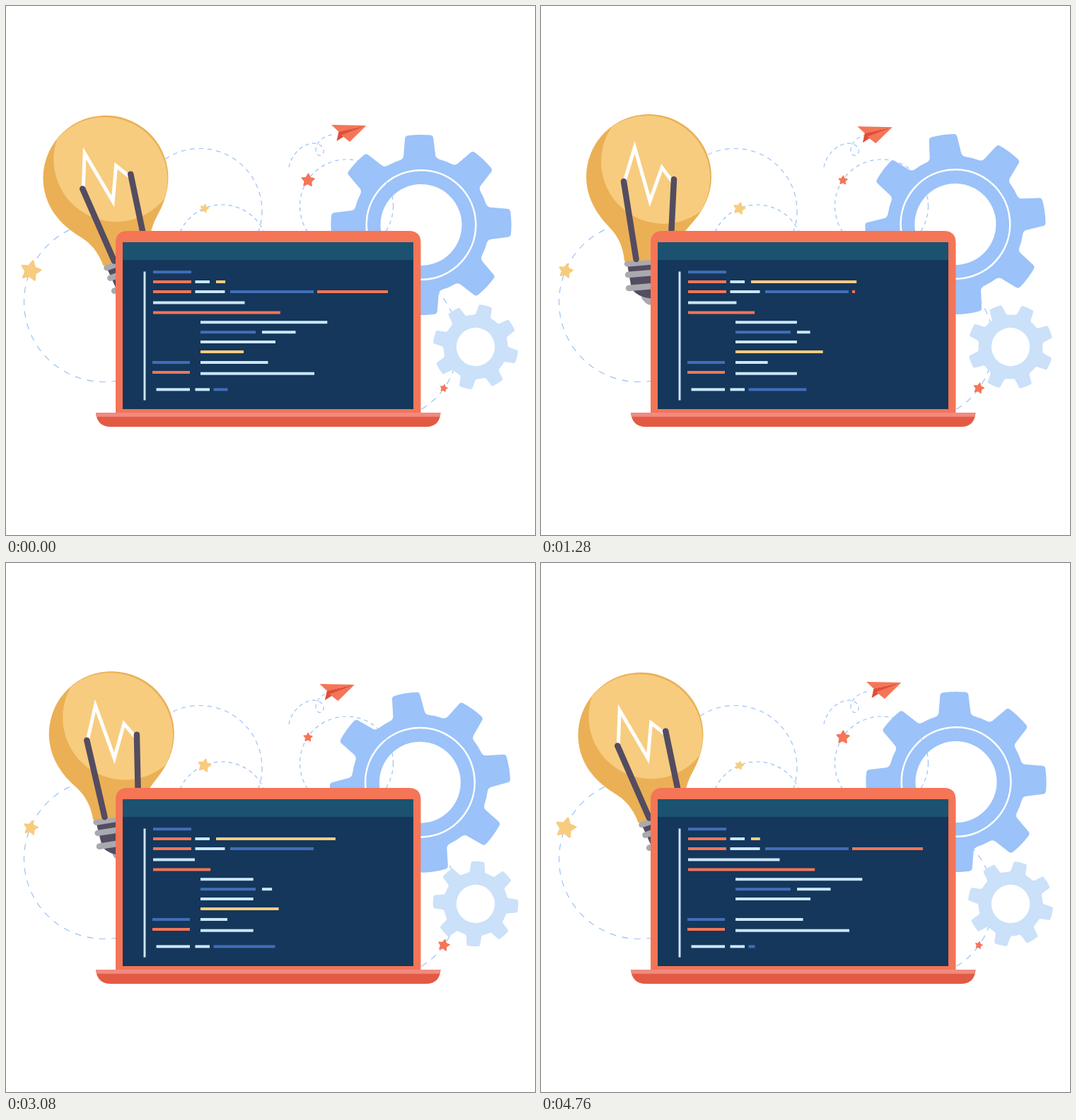
Write an HTML page that moves like this. It is 748 px wide and 748 px high and loops after 4800 ms.

```html
<!DOCTYPE html>
<html lang="en">
<head>
<meta charset="utf-8">
<title>Coding ideas</title>
<style>
  html, body { margin: 0; width: 100%; height: 100%; overflow: hidden; background: #fff; }
  svg { display: block; width: 100%; height: 100%; }
</style>
</head>
<body>
<svg viewBox="0 0 748 748" xmlns="http://www.w3.org/2000/svg">
  <rect width="748" height="748" fill="#fff"/>

  <g fill="none" stroke="#9bc2f9" stroke-width="1.2">
    <circle cx="138.5" cy="418.5" r="113" stroke-dasharray="9 8.5"/>
    <circle cx="274" cy="289.5" r="88" stroke-dasharray="6.5 6"/>
    <circle cx="305.5" cy="346" r="65" stroke-dasharray="5.5 5"/>
    <circle cx="531" cy="477.6" r="108.5" stroke-dasharray="9 8"/>
    <path stroke-dasharray="5.5 4.5" d="M400 228C403 211 418 195 435 194C446 194 452 203 448 209C444 214 438 211 438 203C438 193 449 184 461 182"/>
  </g>

  <g id="bigGear"></g>
  <circle cx="481.5" cy="283" r="66" fill="none" stroke="#9bc2f9" stroke-width="1.2" stroke-dasharray="5.5 5"/>
  <g id="smallGear"></g>

  <g id="plane">
    <path fill="#de4f3a" d="M509 169L470.5 177.5L467.5 191L477 185Z"/>
    <path fill="#f57557" d="M460 168L509.5 169L470.5 177.7ZM509.5 169L474 182.5L486 192Z"/>
  </g>

  <g id="stars" stroke-linejoin="round" stroke-width="2"></g>

  <g id="bulb">
    <path fill="#a9a9b0" d="M141 408H166V419Q153.500 427 146 418Q142 415 141 408Z"/>
    <path fill="#544c60" d="M121 360H184V402Q168 413 155 413.500Q137 412 128 400Z"/>
    <path fill="none" stroke="#a9a9b0" stroke-width="8.500" stroke-linecap="round" d="M122 364.500L184 359M123 380L184 375M124 399L182 394"/>
    <path fill="#ebb055" d="M64 241.500A88.500 88.500 0 0 1 241 241.500C241 268 229 291 210 311C196 326 189 341 188 358L118 361C116 341 110 326 95 311C76 291 64 268 64 241.500Z"/>
    <path fill="#f7cc7f" d="M100 170.900A88.500 88.500 0 0 1 225.500 290.600A88 88 0 0 1 100 170.900Z"/>
    <path fill="none" stroke="#fff" stroke-width="5" d="M118 248L132.500 200L154 276L171 228.500L187 250"/>
    <path fill="none" stroke="#544c60" stroke-width="8.500" stroke-linecap="round" d="M117 248L134.500 358M188 245L182.500 357"/>
  </g>

  <path fill="#f57557" d="M155 576V335Q155 318 172 318H569.500Q586.500 318 586.500 335V576Z"/>
  <rect x="165" y="334" width="411" height="236" fill="#14375b"/>
  <rect x="165" y="334" width="411" height="25" fill="#1b5270"/>
  <path fill="#e35a44" d="M127 575H614.500Q613 595 594 595H148Q129 595 127 575Z"/>
  <path fill="#f08b80" d="M127 575H614.500L613.500 580.700H128Z"/>
  <g id="code"></g>
</svg>

<script>
const LOOP = 4800, SPAN = 4760, TURN = 2220;
const NS = "http://www.w3.org/2000/svg";
const $ = id => document.getElementById(id);
const RED = "#f57557", YELLOW = "#f7cc7f", PALE = "#cbe6fa", BLUE = "#426db8";

function add(parent, tag, attrs) {
  const el = document.createElementNS(NS, tag);
  for (const k in attrs) el.setAttribute(k, attrs[k]);
  return parent.appendChild(el);
}

const mix = (a, b, k) => a + (b - a) * k;
const clamp = (v, lo, hi) => Math.max(lo, Math.min(hi, v));
const tri = (t, period) => 1 - Math.abs(1 - (t % period) / period * 2);
const cubic = u => u < 0.5 ? 4 * u ** 3 : 1 - 4 * (1 - u) ** 3;

// Eight-tooth outline around the origin, one tooth pointing up
function gearPath() {
  const tooth = [[-27, -92.5], [-22.8, -94.5], [-22.5, -98.5], [-20, -122.5],
    [-19.6, -126], [-16, -126.6], [16, -126.6], [19.6, -126],
    [20, -122.5], [22.5, -98.5], [22.8, -94.5], [27, -92.5]];
  let d = "";
  for (let i = 0; i < 8; i++) {
    const a = i * Math.PI / 4, c = Math.cos(a), s = Math.sin(a);
    const p = tooth.map(([x, y]) => (x * c - y * s).toFixed(2) + " " + (x * s + y * c).toFixed(2));
    d += (i ? "A96.4 96.4 0 0 1 " : "M") + p[0] +
      `Q${p[1]} ${p[2]}L${p[3]}Q${p[4]} ${p[5]}A127.500 127.500 0 0 1 ${p[6]}` +
      `Q${p[7]} ${p[8]}L${p[9]}Q${p[10]} ${p[11]}`;
  }
  return d + "A96.4 96.4 0 0 1 " + tooth[0].join(" ") + "Z";
}

const HOLE = "M57.500 0A57.500 57.500 0 1 0 -57.500 0A57.500 57.500 0 1 0 57.500 0Z";
add($("bigGear"), "path", { d: gearPath() + HOLE, fill: "#9bc2f9", "fill-rule": "evenodd" });
add($("bigGear"), "circle", { r: 77.3, fill: "none", stroke: "#fff", "stroke-width": 2.6 });
add($("smallGear"), "path", { d: gearPath(), fill: "#cbe0f9" });
add($("smallGear"), "circle", { r: 57.5, fill: "#fff" });

function starPath() {
  let d = "";
  for (let i = 0; i < 10; i++) {
    const a = i * Math.PI / 5, r = i % 2 ? 4.8 : 9.3;
    d += (i ? "L" : "M") + (r * Math.sin(a)).toFixed(2) + " " + (-r * Math.cos(a)).toFixed(2);
  }
  return d + "Z";
}

// x, y, tilt, colour, radius at the ends, radius in the middle, shrinks early
const stars = [
  [35, 374.5, 13, YELLOW, 15, 10.6, true],
  [280.5, 286.3, 13, YELLOW, 6.5, 11.1, false],
  [427, 246.5, 3, RED, 9.7, 6.7, true],
  [619, 540.5, 13, RED, 5.6, 9.8, false]
].map(([x, y, tilt, color, r0, r1, early]) => ({
  x, y, tilt, r0, r1, early,
  el: add($("stars"), "path", { d: starPath(), fill: color, stroke: color })
}));

function bar(x, y, end, color) {
  return add($("code"), "rect", { x, y: y - 2, width: end - x, height: 4, fill: color });
}

add($("code"), "rect", { x: 194.5, y: 375.5, width: 3, height: 182, fill: PALE });
[
  [208, 376.2, 262, BLUE],
  [208, 390, 262, RED], [267.5, 390, 288, PALE],
  [208, 404, 262, RED], [267.5, 404, 309.5, PALE], [317, 404, 435, BLUE],
  [275, 461.2, 353, BLUE], [207, 504, 260, BLUE], [207, 518, 260, RED],
  [212.5, 542.3, 260, PALE], [267.5, 542.3, 288, PALE]
].forEach(b => bar(...b));

// x, y, colour, right edge at start / turn / end, widest right edge
const lines = [
  [297, 390, YELLOW, 310, 546, 306, 540],
  [440, 404, RED, 541.5, 372.5, 547, 540],
  [208, 419.5, PALE, 342.5, 228, 344.7, 337.5],
  [208, 433.5, RED, 388, 239, 389.5, 388],
  [275, 447.2, PALE, 454.5, 294, 460.8, 454.3],
  [362, 461.2, PALE, 410, 359, 410.3, 409.5],
  [275, 475, PALE, 454.5, 294, 460.8, 381],
  [275, 489, YELLOW, 336, 444.5, 268, 436],
  [275, 504, PALE, 374, 281.5, 376, 370.5],
  [275, 519.7, PALE, 454.5, 294, 460.8, 436],
  [293.5, 542.3, BLUE, 313.5, 420.5, 300.6, 421]
].map(([x, y, color, e0, e1, e2, max]) => ({ x, e0, e1, e2, max, el: bar(x, y, x, color) }));

function draw(time) {
  const t = Math.min(time % LOOP, SPAN);
  const turn = t / SPAN * 360, sway = tri(t, SPAN);

  $("bigGear").setAttribute("transform",
    `translate(586 309.5) rotate(${-turn}) translate(1 0) rotate(-1.25)`);
  $("smallGear").setAttribute("transform",
    `translate(664 482) rotate(${13.6 + turn * 1.5}) scale(0.472)`);
  $("plane").setAttribute("transform", `translate(${-23.5 * sway} ${4.2 * sway})`);
  $("bulb").setAttribute("transform",
    `rotate(${-14.6 * (1 - cubic(tri(t, SPAN / 2)))} 153.5 287.3)`);

  const early = Math.min(1, Math.min(t, SPAN - t) / 1120);
  for (const s of stars) {
    const r = mix(s.r0, s.r1, s.early ? early : sway);
    s.el.setAttribute("transform", `translate(${s.x} ${s.y}) rotate(${s.tilt}) scale(${r / 10})`);
  }

  for (const l of lines) {
    const end = t < TURN ? mix(l.e0, l.e1, t / TURN)
                         : mix(l.e1, l.e2, (t - TURN) / (LOOP - TURN));
    l.el.setAttribute("width", clamp(end, l.x, l.max) - l.x);
  }
}

const start = performance.now();
function tick(now) {
  draw(Math.max(0, now - start));
  requestAnimationFrame(tick);
}
draw(0);
requestAnimationFrame(tick);
</script>
</body>
</html>
```
